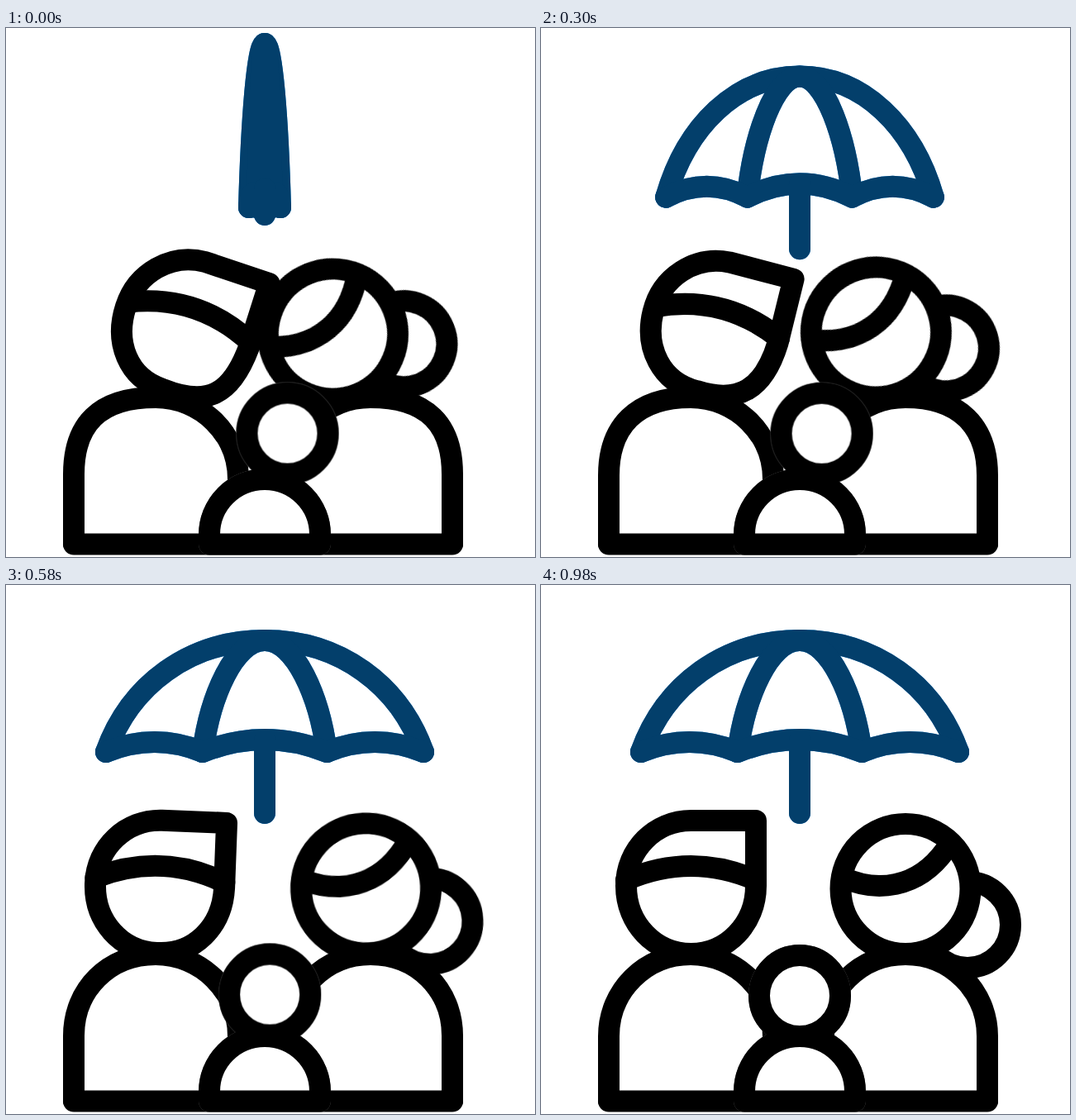
Write an HTML page that moves like this. It is 640 by 640 pixels and loops after 1.04 s.

```html
<!DOCTYPE html>
<html lang="en">
<head>
<meta charset="utf-8">
<title>Family under an umbrella</title>
<style>
html, body { margin: 0; width: 100%; height: 100%; overflow: hidden; background: #fff; }
svg { display: block; width: 100%; height: 100%; }
path, circle { fill: none; stroke: #000; stroke-width: 26; stroke-linecap: round; stroke-linejoin: round; }
.solid { fill: #fff; }

/* --a is the closed pose, --b the open one */
.open, .relax { d: var(--b); animation: open 1040ms cubic-bezier(.58, 0, .12, 1) infinite; }
.relax { animation-name: relax; }
@keyframes open  { 0% { d: var(--a); } 53.85%, 100% { d: var(--b); } }
@keyframes relax { 0% { d: var(--a); } 94.23%, 100% { d: var(--b); } }

.umbrella { filter: drop-shadow(0 0 .5px #1f8ce0); }
.umbrella path { stroke: #033f6b; }
.dome {
  --a: path("M294 217 C297 110 304 19 313 19 C322 19 329 110 332 217");
  --b: path("M121 202 C150 121 222 67 313 67 C404 67 476 121 505 202");
}
.ribs {
  --a: path("M304 217 C306 120 309 19 313 19 C317 19 320 120 322 217");
  --b: path("M238 202 C247 135 276 67 313 67 C350 67 379 135 388 202");
}
.hem {
  --a: path("M294 217 Q299 183 304 217 Q313 172 322 217 Q327 183 332 217");
  --b: path("M121 202 Q180 178 238 202 Q313 172 388 202 Q446 178 505 202");
}
.handle {
  --a: path("M313 195 L313 226");
  --b: path("M313 188 L313 276");
}

.man-body {
  --a: path("M82 624 L82 540 C82 480 112 447 181 447 C236 447 281 491 281 546 L281 624");
  --b: path("M82 624 L82 546 C82 491 126 447 181 447 C236 447 281 491 281 546 L281 624");
}
.woman-body {
  --a: path("M342 624 L342 546 C342 491 386 447 441 447 C510 447 540 480 540 540 L540 624");
  --b: path("M342 624 L342 546 C342 491 386 447 441 447 C496 447 540 491 540 546 L540 624");
}
.man-head {
  --a: path("M318.5 309 L241 283 C200 272 158 296 145 337 C131 380 147 423 190 437 C243 458 272 445 294 386 Z");
  --b: path("M260 285 L181.5 285 C138 285 103 320 103 364 C103 410 138 446 181.5 446 C225 446 260 410 260 364 Z");
}
.man-hair {
  --a: path("M148 331.5 Q233 322 296 380.5");
  --b: path("M103 357 Q181.5 323 260 357");
}

.woman-head {
  transform-origin: 424.7px 485.8px;
  animation: tilt 1040ms cubic-bezier(.58, 0, .12, 1) infinite;
}
@keyframes tilt { 0% { transform: rotate(-22deg); } 94.23%, 100% { transform: rotate(0deg); } }

.child { filter: drop-shadow(0 0 .4px #777); }
.child-head { animation: slide 1040ms cubic-bezier(.65, 0, .12, 1) infinite; }
@keyframes slide {
  0%, 15.38% { transform: translate(27.5px, -6.5px); }
  94.23%, 100% { transform: translate(0px, 0px); }
}
</style>
</head>
<body>
<svg viewBox="0 0 640 640">
  <g class="umbrella">
    <path class="open dome"/>
    <path class="open ribs"/>
    <path class="open hem"/>
    <path class="open handle"/>
  </g>

  <path class="relax man-body"/>
  <path class="relax woman-body"/>
  <path d="M82 624.5H540"/>

  <path class="relax man-head"/>
  <path class="relax man-hair"/>

  <g class="woman-head">
    <circle cx="516" cy="411" r="52"/>
    <circle class="solid" cx="441" cy="367.5" r="78.5"/>
    <path d="M366 354C405 372 455 368 489 321"/>
  </g>

  <g class="child">
    <circle class="solid child-head" cx="313" cy="497" r="49"/>
    <path class="solid" d="M246 624.5V613A67 67 0 0 1 380 613V624.5Z"/>
  </g>
</svg>
</body>
</html>
```
